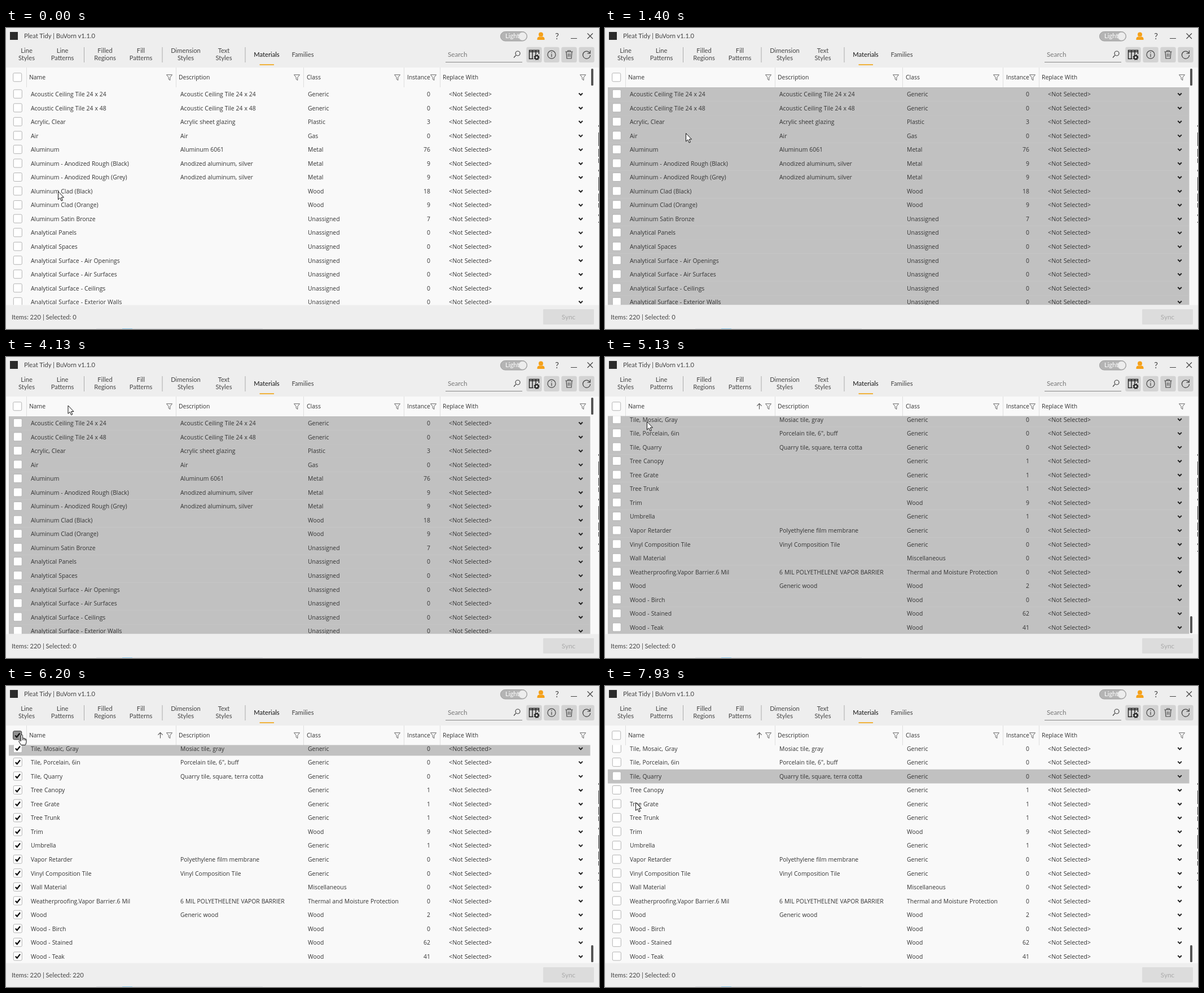
An HTML page for the animation above (8 s loop, 1051 px wide and 533 px high).

```html
<!DOCTYPE html>
<html lang="en">
<head>
<meta charset="utf-8">
<title>Materials</title>
<style>
html, body { margin: 0; width: 100%; height: 100%; overflow: hidden; background: #eee; }
svg { display: block; }
text { font: 10.4px "Open Sans", "Noto Sans", sans-serif; word-spacing: .3px; fill: #333; white-space: pre; }
.ui { font: 11.2px Lato, "Open Sans", sans-serif; word-spacing: 0; fill: #444; }
.line { fill: none; stroke: #444; stroke-width: 1.2; }
</style>
</head>
<body>
<svg id="stage" width="1051" height="533" viewBox="0 0 1051 533">
  <defs><clipPath id="view"><rect x="5" y="104.6" width="1031" height="386"/></clipPath></defs>
</svg>
<script>
const stage = document.getElementById('stage');
const ROW = 24.54, TOP = 105, FRAME = 200 / 3, LOOP = 8000, LEAD = 12;

function add(parent, tag, attrs, label) {
  const el = document.createElementNS('http://www.w3.org/2000/svg', tag);
  for (const k in attrs) el.setAttribute(k, attrs[k]);
  if (label !== undefined) el.textContent = label;
  parent.appendChild(el);
  return el;
}
const rect = (p, x, y, width, height, fill, more) => add(p, 'rect', { x, y, width, height, fill, ...more });
const path = (p, d, more) => add(p, 'path', { d, class: 'line', ...more });
const text = (p, x, y, label, more) => add(p, 'text', { x, y, ...more }, label);
const ui = (x, y, label, more) => text(stage, x, y, label, { class: 'ui', ...more });
const middle = { 'text-anchor': 'middle' };
const show = (el, on) => el.setAttribute('display', on ? 'inline' : 'none');

function checkbox(parent, cx, cy) {
  const g = add(parent, 'g', { transform: `translate(${cx} ${cy})` });
  const box = rect(g, -7.5, -7.5, 15, 15, '#fff', { rx: 2, stroke: '#b3b3b3' });
  const tick = path(g, 'M-4 .2L-1.2 3.2L4.2-3.6', { style: 'stroke:#111;stroke-width:2.3' });
  return (checked, hover, pressed) => {
    show(tick, checked);
    box.setAttribute('fill', pressed ? '#919191' : '#fff');
    box.setAttribute('stroke', pressed ? '#333' : hover ? '#777' : '#b3b3b3');
  };
}

// Title bar
rect(stage, 0, 0, 1051, 533, '#eee');
rect(stage, 7, 7, 14, 14, '#2b2b2b');
ui(32, 18, 'Pleat Tidy | BuVorn v1.1.0');
rect(stage, 876.5, 6.5, 47, 16.5, '#b4b4b4', { rx: 8.2, stroke: '#9c9c9c' });
ui(885, 18, 'Light', { style: 'fill:#fff' });
add(stage, 'circle', { cx: 915.5, cy: 14.7, r: 7, fill: '#ededed' });
path(stage, 'M948 7.5a3.6 3.6 0 0 1 0 8a3.6 3.6 0 0 1 0-8ZM941.5 21v-2q0-3 4-3.8q2.5 1.6 5 0q4 .8 4 3.8v2Z', { style: 'fill:#f5a11a;stroke:none' });
ui(976.5, 20, '?', { ...middle, style: 'font-size:15px' });
path(stage, 'M1001 18.5H1012M1030.5 9.5l9.5 9.5M1040 9.5l-9.5 9.5');

// Tool bar
[[36.5, 'Line', 'Styles'], [100, 'Line', 'Patterns'], [175.5, 'Filled', 'Regions'], [239, 'Fill', 'Patterns'],
 [318.5, 'Dimension', 'Styles'], [386, 'Text', 'Styles']].forEach(([x, a, b]) => {
  ui(x, 44, a, middle);
  ui(x, 56.5, b, middle);
});
for (const x of [138.5, 277, 424]) path(stage, `M${x} 34V61`, { style: 'stroke:#aaa;stroke-width:1' });
ui(462, 51, 'Materials', { ...middle, style: 'fill:#111' });
ui(526, 51, 'Families', middle);
rect(stage, 449.5, 64, 25.5, 2, '#f0b23a');
ui(783, 51, 'Search', { style: 'fill:#777;font-size:11.7px' });
path(stage, 'M779 60.5H915', { style: 'stroke:#888;stroke-width:1' });
path(stage, 'M903.5 48.5L900 52.5M903 45a4 4 0 1 0 8 0a4 4 0 1 0-8 0');
for (const x of [936, 967, 998, 1029]) rect(stage, x - 13.7, 33.7, 27.4, 27.4, '#d3d3d3', { rx: 3 });
path(stage, 'M934.5 54.5H927.5V39.5H944.5V46M927.5 42H944.5M933 39.5V54.5M939 39.5V47', { style: 'stroke:#222;stroke-width:1.4' });
add(stage, 'circle', { cx: 940.5, cy: 52, r: 2.9, fill: 'none', stroke: '#222', 'stroke-width': 2 });
add(stage, 'circle', { cx: 940.5, cy: 52, r: 4.3, fill: 'none', stroke: '#222', 'stroke-width': 1.5, 'stroke-dasharray': '1.7 1.68' });
path(stage, 'M960 47.2a7 7 0 1 0 14 0a7 7 0 1 0-14 0M967 46V51.3M967 42.8V44.4');
path(stage, 'M991.5 42H1004.5M995.8 42V40H1000.2V42M993 42L994 54H1002L1003 42M996.5 45V51M999.5 45V51');
path(stage, 'M1034.8 44.5A6.6 6.6 0 1 0 1035.6 48M1035.5 39.8V44.8H1030.5');

// Table header
rect(stage, 0, 70, 1051, 421, '#f9f9f9');
for (const x of [36.5, 301.5, 527.5, 705.5, 769.5]) path(stage, `M${x} 70V105`, { style: 'stroke:#dedede;stroke-width:1' });
[[41, 'Name'], [306, 'Description'], [533, 'Class'], [711, 'Instance'], [774, 'Replace With']]
  .forEach(([x, s]) => text(stage, x, 91.2, s));
const funnels = [289.5, 515.5, 693.5, 757.5, 1022.5].map(x =>
  path(stage, `M${x - 5} 82.8h10l-3.7 4.7v5l-2.6-1.8v-3.2Z`, { style: 'stroke:#666;stroke-width:1' }));
const arrow = path(stage, 'M273.5 92.5V82.5M269.3 86.7L273.5 82.5L277.7 86.7', { style: 'stroke:#555;stroke-width:1.1' });
const headBox = checkbox(stage, 20.2, 87.3);

// Rows: name|description|class|instances
const first = `Acoustic Ceiling Tile 24 x 24|Acoustic Ceiling Tile 24 x 24|Generic|0
Acoustic Ceiling Tile 24 x 48|Acoustic Ceiling Tile 24 x 48|Generic|0
Acrylic, Clear|Acrylic sheet glazing|Plastic|3
Air|Air|Gas|0
Aluminum|Aluminum 6061|Metal|76
Aluminum - Anodized Rough (Black)|Anodized aluminum, silver|Metal|9
Aluminum - Anodized Rough (Grey)|Anodized aluminum, silver|Metal|9
Aluminum Clad (Black)||Wood|18
Aluminum Clad (Orange)||Wood|9
Aluminum Satin Bronze||Unassigned|7
Analytical Panels||Unassigned|0
Analytical Spaces||Unassigned|0
Analytical Surface - Air Openings||Unassigned|0
Analytical Surface - Air Surfaces||Unassigned|0
Analytical Surface - Ceilings||Unassigned|0
Analytical Surface - Exterior Walls||Unassigned|0`;
const last = `Tile, Mosaic, Gray|Mosiac tile, gray|Generic|0
Tile, Porcelain, 6in|Porcelain tile, 6", buff|Generic|0
Tile, Quarry|Quarry tile, square, terra cotta|Generic|0
Tree Canopy||Generic|1
Tree Grate||Generic|1
Tree Trunk||Generic|1
Trim||Wood|9
Umbrella||Generic|1
Vapor Retarder|Polyethylene film membrane|Generic|0
Vinyl Composition Tile|Vinyl Composition Tile|Generic|0
Wall Material||Miscellaneous|0
Weatherproofing.Vapor Barrier.6 Mil|6 MIL POLYETHELENE VAPOR BARRIER|Thermal and Moisture Protection|0
Wood|Generic wood|Wood|2
Wood - Birch||Wood|0
Wood - Stained||Wood|62
Wood - Teak||Wood|41`;

const table = add(stage, 'g', { 'clip-path': 'url(#view)' });
function page(data, top) {
  const g = add(table, 'g', {});
  const rows = data.split('\n').map((line, i) => {
    const y = top + ROW * i, mid = y + ROW / 2, base = mid + 3.8;
    const [name, note, kind, count] = line.split('|');
    const back = rect(g, 5, y, 1030.5, ROW + .3, '#c1c1c1');
    const box = checkbox(g, 20.8, mid - .5);
    text(g, 44, base, name);
    text(g, 309, base, note);
    text(g, 535, base, kind);
    text(g, 752, base, count, { 'text-anchor': 'end' });
    text(g, 785, base, '<Not Selected>', { style: 'font-size:10.75px' });
    path(g, `M1015.3 ${mid - 1.8}l3.3 3.3l3.3-3.3`, { style: 'stroke:#222;stroke-width:2' });
    return { back, box };
  });
  return { g, rows };
}
const pages = [page(first, TOP), page(last, TOP - 6.4)];
const thumb = rect(stage, 1037, 72, 4, 30, '#555', { rx: 1.5 });

// Status bar and window edge
rect(stage, 0, 490.6, 1051, 43, '#eee');
const status = ui(10, 515.5, '');
rect(stage, 952, 498, 90, 27, '#dcdcdc', { rx: 1 });
ui(997, 515.5, 'Sync', { ...middle, style: 'fill:#aaa;font-size:11.8px' });
rect(stage, 160, 532, 295, 1, '#d9dce0');
rect(stage, 206, 532, 18, 1, '#8cc8ea');
path(stage, 'M1050.5 172V345', { style: 'stroke:#444;stroke-width:1', 'stroke-dasharray': '3 10 24 5 14 3 8 12' });

// Pointer
const pointer = add(stage, 'g', {});
const ink = { style: 'fill:#fff;stroke:#111;stroke-width:1;stroke-linejoin:round' };
const tip = path(pointer, 'M0 0V14.3L3.3 11.3L5.6 16.6L7.8 15.6L5.6 10.5H10Z', ink);
const hand = path(pointer, 'M-1.5 11V.8Q0-1.2 1.5.8V6Q3 5 4 6.5Q5.6 5.6 6.3 7.3Q8 6.9 8 9V13L6.3 18H-1.2L-5 12.2Q-5.4 9.6-3.3 10.2ZM1.5 6V9.5M4 6.5V9.7M6.3 7.3V10', ink);

// Pointer stops: time, x, y
const stops = [
  [0, 92.5, 289.5], [333, 143.5, 186.5], [1533, 143.5, 186.5], [2200, 26.5, 119.5], [3200, 26.5, 119.5],
  [3800, 110, 86], [4467, 110, 86], [4933, 74.5, 113], [5067, 74.5, 113], [5133, 74.5, 114.5],
  [5200, 74.5, 114.5], [5533, 28, 86.5], [6400, 28, 86.5], [6667, 70, 152], [7067, 70, 152],
  [7333, 50, 250], [7667, 30.5, 166.5], [7800, 30.5, 166.5], [7933, 54.5, 206.3], [LOOP, 54.5, 206.3]
];
function place(t) {
  const i = Math.max(1, stops.findIndex(s => s[0] > t));
  const [t0, x0, y0] = stops[i - 1], [t1, x1, y1] = stops[i];
  const u = (t - t0) / (t1 - t0), e = u * u * (3 - 2 * u);
  return [x0 + (x1 - x0) * e, y0 + (y1 - y0) * e];
}

function draw(ms) {
  // The screen changes 15 times a second; LEAD absorbs clock rounding at each step.
  const t = Math.floor((ms + LEAD) % LOOP / FRAME) * FRAME + 1;
  const within = (a, b) => t >= a && t < b;
  const end = t >= 4400;
  const checked = within(2533, 3200) || within(5733, 6400);
  const all = within(1400, 5200);
  const picked = t < 733 ? -1 : t < 1400 ? 3 : t < 7067 ? 0 : 2;
  const rowDown = within(2400, 2533) || within(3000, 3200);
  const headDown = within(5667, 5733) || within(6200, 6400);
  const [x, y] = place(t);
  const over = x <= 29;

  pages.forEach((p, n) => {
    show(p.g, n === +end);
    p.rows.forEach((r, i) => {
      show(r.back, all || i === picked);
      r.box(checked, over && !end && i === 0, rowDown && i === 0);
    });
  });
  headBox(checked, over && end, headDown);
  show(arrow, end);
  funnels[0].style.stroke = within(3733, 4133) ? '#333' : '#666';
  thumb.setAttribute('y', end ? 459 : 72);
  status.textContent = 'Items: 220 | Selected: ' + (checked ? 220 : 0);
  pointer.setAttribute('transform', `translate(${x} ${y})`);
  show(tip, !over);
  show(hand, over);
}

const start = performance.now();
function tick(now) {
  draw(Math.max(0, now - start));
  requestAnimationFrame(tick);
}
draw(0);
requestAnimationFrame(tick);
</script>
</body>
</html>
```
